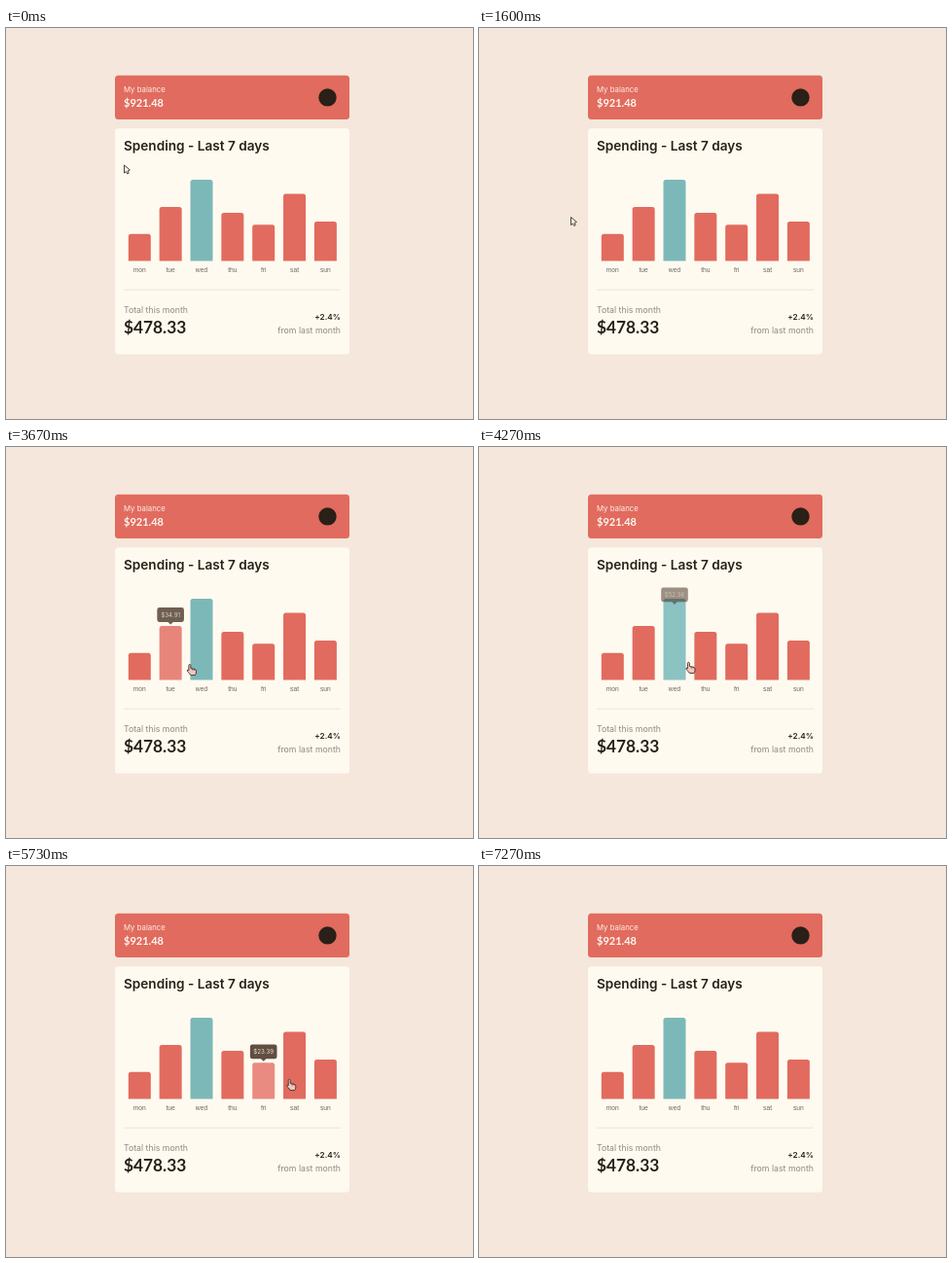
An HTML page with a canvas that plays this animation: 480 px wide and 402 px high, repeating every 7390 ms.

```html
<!DOCTYPE html>
<html lang="en">
<head>
<meta charset="utf-8">
<title>Spending chart</title>
<style>
  html, body { margin: 0; width: 100%; height: 100%; overflow: hidden; background: #f5e7db; }
  canvas { display: block; width: 480px; height: 402px; }
</style>
</head>
<body>
<canvas id="stage"></canvas>
<script>
const W = 480, H = 402, LOOP = 7390, STEP = 1000 / 15;
const canvas = document.getElementById('stage');
const ctx = canvas.getContext('2d');
const ratio = window.devicePixelRatio || 1;
canvas.width = W * ratio;
canvas.height = H * ratio;

const RED = [225, 107, 94], RED_HOVER = [234, 139, 129];
const TEAL = [124, 184, 184], TEAL_HOVER = [160, 208, 207];
const CREAM = '#fefaf0', DARK = '#2a2018', GREY = '#92877d';
const WORDS = 'Inter, "Open Sans", sans-serif';
const FIGURES = 'Lato, "Open Sans", sans-serif';
const LABELS = '"Liberation Sans", Arial, sans-serif';

const BASE = 239.5, BAR_W = 23, PITCH = 31.85, SCALE = 1.593;

// on / off: when the pointer enters and leaves the bar
const bars = [
  { day: 'mon', value: 17.45, on: 2360, off: 2819 },
  { day: 'tue', value: 34.91, on: 2960, off: 3647 },
  { day: 'wed', value: 52.36, on: 3730, off: 4190 },
  { day: 'thu', value: 31.07, on: 4390, off: 4880 },
  { day: 'fri', value: 23.39, on: 5060, off: 5735 },
  { day: 'sat', value: 43.28, on: 5780, off: 6130 },
  { day: 'sun', value: 25.48, on: 6260, off: 6660 }
].map((b, i) => ({
  ...b,
  x: 125.8 + i * PITCH,
  top: BASE - b.value * SCALE
}));

// time, x, y of the pointer
const path = [
  [0, 121, 140.5], [750, 121, 140.5], [1600, 94, 194], [1800, 90, 204],
  [2100, 101, 215], [2330, 125, 222], [2870, 154, 226], [3670, 186, 223],
  [4800, 236, 219], [5530, 276, 219], [5730, 288, 219], [6330, 322, 216],
  [6800, 352, 211], [7130, 384, 202], [7200, 424, 192]
];

const arrow = new Path2D('M.5 .5 L.5 8.6 L2.5 7 L3.7 9.4 L5.2 8.7 L4.1 6.4 L6.4 5.5 Z');
const hand = new Path2D('M2 7 V1.4 C2 .2 4 .2 4 1.4 V4.6 L7.8 5.3 Q9.6 5.7 9.6 7.2 ' +
  'V9 Q9.5 10.4 8.6 11.6 H4 Q3.2 10 1 8.1 Q-.1 7 .7 6.3 Q1.4 6 2 7 Z');
const fold = new Path2D('M5.9 5 V6.8 M7.8 5.4 V6.9');

const clamp = v => Math.max(0, Math.min(1, v));
const easeOut = p => 1 - Math.pow(1 - p, 4);
const mix = (a, b, p) => `rgb(${a.map((v, i) => Math.round(v + (b[i] - v) * p)).join(',')})`;

function fade(b, t, length, ease) {
  const inward = ease(clamp((t - b.on) / length));
  return t < b.off ? inward : 1 - ease(clamp((t - b.off) / length));
}

function box(x, y, w, h, r, color) {
  ctx.fillStyle = color;
  ctx.beginPath();
  ctx.roundRect(x, y, w, h, r);
  ctx.fill();
}

function text(str, x, y, font, color, align = 'left') {
  ctx.font = font;
  ctx.fillStyle = color;
  ctx.textAlign = align;
  ctx.fillText(str, x, y);
}

function drawCards() {
  ctx.fillStyle = '#f5e7db';
  ctx.fillRect(0, 0, W, H);

  box(112, 48.8, 241, 45.2, 3.5, mix(RED, RED, 0));
  text('My balance', 121, 66.2, `400 7.8px ${WORDS}`, '#fdeee6');
  text('$921.48', 121, 81.2, `700 11px ${FIGURES}`, '#fff8f1');
  ctx.fillStyle = DARK;
  ctx.beginPath();
  ctx.arc(330.5, 71.4, 9.2, 0, Math.PI * 2);
  ctx.fill();

  box(112, 103.2, 241, 232.4, 3.5, CREAM);
  text('Spending - Last 7 days', 121, 125.8, `600 13.6px ${WORDS}`, DARK);
  ctx.fillStyle = '#ece5dc';
  ctx.fillRect(121, 268.7, 223, 1);
  text('Total this month', 121, 293.3, `400 8.75px ${WORDS}`, GREY);
  text('$478.33', 121, 313.6, `700 17.3px ${FIGURES}`, DARK);
  text('+2.4%', 344, 300, `600 8.2px ${WORDS}`, DARK, 'right');
  text('from last month', 344, 313.7, `400 8.75px ${WORDS}`, GREY, 'right');
}

function drawBar(b, t) {
  const glow = fade(b, t, 400, easeOut);
  const color = b.day === 'wed' ? mix(TEAL, TEAL_HOVER, glow) : mix(RED, RED_HOVER, glow);
  box(b.x, b.top, BAR_W, BASE - b.top, [2.5, 2.5, 0, 0], color);
  text(b.day, b.x + BAR_W / 2, 251.4, `6.7px ${LABELS}`, '#6e6964', 'center');
}

function drawTip(b, t) {
  const alpha = fade(b, t, 200, p => p);
  if (!alpha) return;
  const mid = b.x + BAR_W / 2;
  const y = Math.max(144.5, b.top - 18.8);
  ctx.save();
  ctx.globalAlpha = alpha;
  ctx.fillStyle = 'rgba(56,35,20,.8)';
  ctx.beginPath();
  ctx.roundRect(mid - 13.8, y, 27.6, 14.8, 2.3);
  ctx.moveTo(mid - 2.7, y + 14.8);
  ctx.lineTo(mid + 2.7, y + 14.8);
  ctx.lineTo(mid, y + 17.4);
  ctx.fill();
  text('$' + b.value.toFixed(2), mid, y + 9.7, `400 6.2px ${WORDS}`, '#e8dfd4', 'center');
  ctx.restore();
}

function drawPointer(t) {
  if (t > 7230) return;
  let i = 0;
  while (i < path.length - 2 && t >= path[i + 1][0]) i++;
  const [t0, x0, y0] = path[i], [t1, x1, y1] = path[i + 1];
  const p = clamp((t - t0) / (t1 - t0));
  const pointing = t > 2320 && t < 6640;
  const shape = pointing ? hand : arrow;
  ctx.save();
  ctx.translate(x0 + (x1 - x0) * p, y0 + (y1 - y0) * p);
  ctx.lineJoin = 'round';
  ctx.lineWidth = 0.9;
  ctx.strokeStyle = '#3a302c';
  ctx.fillStyle = pointing ? '#f3c6bb' : '#faf4ec';
  ctx.fill(shape);
  ctx.stroke(shape);
  if (pointing) {
    ctx.lineWidth = 0.6;
    ctx.stroke(fold);
  }
  ctx.restore();
}

function draw(now) {
  const t = Math.floor((now % LOOP + 4) / STEP) * STEP;
  ctx.setTransform(ratio, 0, 0, ratio, 0, 0);
  drawCards();
  bars.forEach(b => drawBar(b, t));
  bars.forEach(b => drawTip(b, t));
  drawPointer(t);
}

const start = performance.now();
function tick() {
  draw(performance.now() - start);
  requestAnimationFrame(tick);
}
tick();
</script>
</body>
</html>
```
